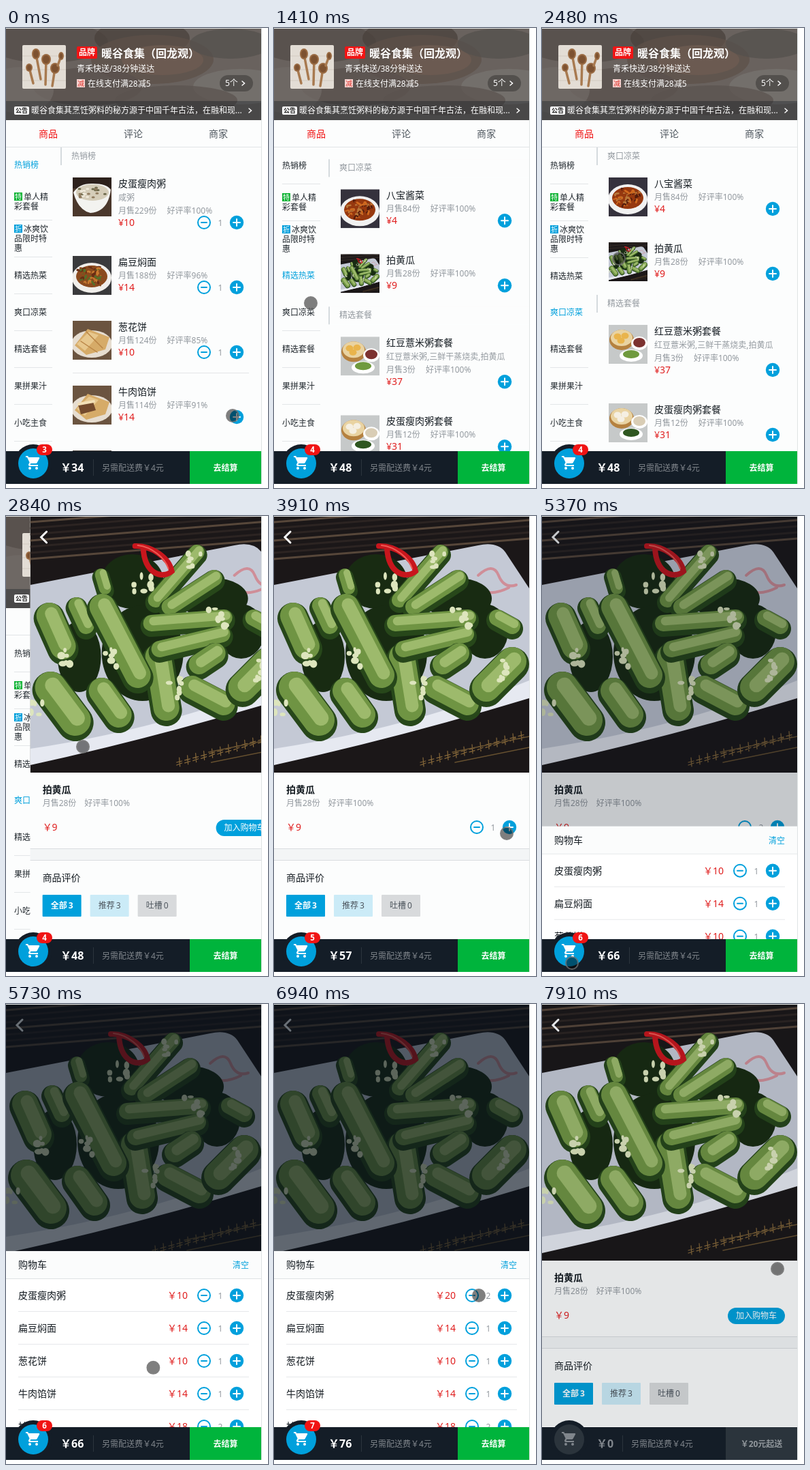
An HTML page that plays this animation: 385x674 px, repeating every 8 s.

```html
<!DOCTYPE html>
<html lang="zh-CN">
<head>
<meta charset="utf-8">
<title>点餐</title>
<style>
html, body { margin: 0; width: 100%; height: 100%; overflow: hidden; background: #fff; }
body { position: relative; font-family: "Noto Sans", "Noto Sans CJK SC", "Noto Sans CJK", sans-serif; }
div, svg { position: absolute; }
.t { white-space: pre; line-height: 20px; height: 20px; }
.t i { font-style: normal; margin-left: 15px; }
.b { font-weight: 700; }
.c { text-align: center; }
.box { box-sizing: border-box; }
.clip { overflow: hidden; }
</style>
</head>
<body>
<script>
(() => {
const LOOP = 8000;
const BLUE = '#00a0dc', RED = '#e02020', INK = '#151c22', GREY = '#93999f', DARK = '#141d27', PAGE = '#fcfdfd';

// ---------- markup helpers ----------
const box = (x, y, w, h, bg, css = '', inner = '', cls = '') =>
  `<div class="box ${cls}" style="left:${x}px;top:${y}px;width:${w}px;height:${h}px;background:${bg};${css}">${inner}</div>`;
const text = (x, y, size, color, str, cls = '', css = '') =>
  `<div class="t ${cls}" style="left:${x}px;top:${y - 10}px;font-size:${size}px;color:${color};${css}">${str}</div>`;
const mid = (x, y, w, size, color, str, cls = '') =>
  text(x - w / 2, y, size, color, str, 'c ' + cls, `width:${w}px`);
const svg = (x, y, w, h, view, inner) =>
  `<svg style="left:${x}px;top:${y}px" width="${w}" height="${h}" viewBox="0 0 ${view}">${inner}</svg>`;
const oval = (x, y, rx, ry, color, extra = '') =>
  `<ellipse cx="${x}" cy="${y}" rx="${rx}" ry="${ry}" fill="${color}" ${extra}/>`;
const stroke = (d, color, w) =>
  `<path d="${d}" fill="none" stroke="${color}" stroke-width="${w}" stroke-linecap="round"/>`;
const fill = (d, color) => `<path d="${d}" fill="${color}"/>`;
const random = seed => () => (seed = (seed * 16807) % 2147483647) / 2147483647;

function add(parent, html) {
  parent.insertAdjacentHTML('beforeend', html);
  return parent.lastElementChild;
}

// ---------- pictures ----------
function dish(bg, plate, colors, seed) {
  const r = random(seed * 7919);
  let s = `<rect width="57" height="57" fill="${bg}"/>` + oval(28, 32, 29, 22, plate) + oval(28, 30, 23, 16, colors[0]);
  for (let i = 0; i < 46; i++) {
    const a = r() * 6.28, d = Math.sqrt(r()), x = 28 + 19 * d * Math.cos(a), y = 29 + 13 * d * Math.sin(a);
    s += stroke(`M${x} ${y}q${r() * 8 - 4} ${-r() * 6} ${r() * 12 - 6} ${r() * 8 - 4}`, colors[i % colors.length], 1.5 + r() * 2);
  }
  return s;
}

function porridge() {
  let s = `<rect width="57" height="57" fill="#4b382c"/><rect width="57" height="16" fill="#2d211c"/>` +
    fill('M1 22Q10 8 30 9Q50 9 56 18Q52 50 26 52Q8 48 1 22Z', '#f3f3f0') + oval(29, 22, 24, 12, '#d5cdb9');
  const r = random(77);
  for (let i = 0; i < 24; i++) s += oval(10 + r() * 38, 15 + r() * 14, 2.5, 1.5, ['#6d6a4c', '#f0eadb', '#8f7a5d'][i % 3]);
  return s;
}

const flatbread = cut =>
  `<rect width="57" height="57" fill="#6b5440"/>` + oval(28, 34, 30, 20, '#e6ddd0') +
  fill('M3 36L22 12L54 24L48 42L20 50Z', '#d6ab68') + fill('M6 34L24 16L38 21L18 44Z', '#e7c78d') +
  (cut ? fill('M8 28L30 24L34 36L12 42Z', '#744a2d') + stroke('M9 27L31 23', '#f3dfb6', 4)
       : stroke('M20 16L44 40M12 30L36 46', '#b98445', 1.5));

const steamers = buns =>
  `<rect width="57" height="57" fill="#c6c9c9"/>` +
  oval(19, 22, 18, 15, '#b5813f') + oval(19, 19, 16, 12, '#e9d3a2') +
  [[13, 17], [24, 16], [18, 23]].map(p => oval(p[0], p[1], 5.5, 4.5, buns ? '#f5efe2' : '#e9b44c')).join('') +
  oval(45, 27, 12, 10, '#fff') + oval(45, 26, 9, 7, buns ? '#d9cdb5' : '#7c3230') +
  oval(33, 45, 17, 9, '#fff') + oval(33, 43, 12, 6, buns ? '#2f5720' : '#6f9a3e');

function cucumber() {
  let s = `<rect width="375" height="375" fill="#1b1718"/>`;
  for (let i = 0; i < 7; i++) s += stroke(`M0 ${8 + i * 9}L375 ${-22 + i * 9}`, i % 3 ? '#2c2422' : '#57473a', 3);
  s += fill('M0 100L300 42Q328 36 340 52L375 105V262Q190 322 0 362Z', '#c4c9d5') +
    fill('M0 340Q200 310 375 240V266Q190 322 0 364Z', '#e6e9f1') +
    stroke('M300 86q22 -20 30 0t26 14M305 108q16 8 40 -4', '#cf8e98', 4);
  for (const [x, y, w, h] of [[150, 95, 46, 40], [72, 205, 32, 52], [165, 200, 60, 70], [310, 168, 34, 40], [270, 120, 50, 30]])
    s += oval(x, y, w, h, '#182b12');
  // each piece: start, end, width
  const pieces = [
    [104, 85, 110, 105, 22], [68, 130, 82, 160, 28], [28, 145, 48, 190, 42], [30, 250, 66, 298, 50],
    [105, 255, 130, 290, 42], [188, 205, 200, 280, 42], [328, 148, 350, 160, 28], [245, 52, 184, 122, 26],
    [270, 90, 205, 132, 28], [178, 156, 285, 148, 28], [190, 194, 282, 172, 28], [248, 216, 272, 200, 34],
    [238, 250, 284, 274, 38], [312, 250, 350, 212, 46], [106, 132, 158, 232, 42]
  ];
  for (const [a, b, c, d, w] of pieces) {
    s += stroke(`M${a} ${b + 4}L${c} ${d + 4}`, '#27471a', w + 4) + stroke(`M${a} ${b}L${c} ${d}`, '#6f9443', w - 4) +
      stroke(`M${a + 3} ${b - 3}L${c + 3} ${d - 3}`, '#9dba6c', w * .45);
  }
  const r = random(4242);
  for (const [x, y] of [[165, 95], [115, 205], [50, 205], [245, 60], [275, 150], [340, 225], [8, 285], [215, 250]])
    for (let i = 0; i < 7; i++) s += oval(x + r() * 26 - 13, y + r() * 30 - 15, 2 + r() * 4, 2 + r() * 4, '#dde5bd');
  s += stroke('M154 43C178 42 204 60 208 80C194 92 168 84 166 46', '#c8161d', 8) + stroke('M158 42C178 44 198 60 203 76', '#ee5a54', 2);
  for (let i = 0; i < 13; i++)
    s += stroke(`M${215 + i * 12} ${360 - i * 3.2}l8 -2m-4 -5l1 13m-5 -2l8 -${2 + r() * 3}`, '#86683a', 1.2);
  return s + stroke('M262 345L375 322M266 360L375 338', '#66502f', 1.5);
}

const PICS = {
  porridge: porridge(),
  noodle: dish('#3a3a3c', '#f0eeea', ['#8b4a1d', '#c87a2f', '#54702a', '#692d14'], 3),
  pancake: flatbread(false),
  pie: flatbread(true),
  pickle: dish('#35323d', '#f1f1f1', ['#96380f', '#d0691f', '#541c0c', '#b9783a'], 8),
  greens: dish('#48413b', '#eeeeea', ['#5c8136', '#a9bb63', '#385620', '#d6c78a'], 12),
  set: steamers(false),
  set2: steamers(true)
};
const CUCUMBER = cucumber();
const thumb = (x, y, pic) => pic === 'cucumber'
  ? svg(x, y, 57, 57, '375 375', CUCUMBER) : svg(x, y, 57, 57, '57 57', PICS[pic]);

// ---------- cart model: name, price, amount at the start ----------
const CART = [['皮蛋瘦肉粥', 10, 1], ['扁豆焖面', 14, 1], ['葱花饼', 10, 1], ['牛肉馅饼', 14, 0], ['拍黄瓜', 9, 0]];
// time, item, change, ball start
const CLICKS = [[120, 3, 1, 339, 570], [3570, 4, 1, 315, 457], [4390, 4, 1, 345, 456], [6580, 0, 1, 339, 427], [7180, 0, -1]];
const CLEAR = 7790;
const amounts = t => CART.map((f, i) => t >= CLEAR ? 0 :
  CLICKS.reduce((n, c) => n + (c[1] === i && t >= c[0] ? c[2] : 0), f[2]));

// ---------- count controls ----------
const controls = [];
function control(parent, x, y, item) {
  const minus = add(parent, svg(x - 11, y - 11, 22, 22, '22 22',
    `<circle cx="11" cy="11" r="9" fill="none" stroke="${BLUE}" stroke-width="2"/>` + stroke('M7 11H15', BLUE, 2)));
  const count = add(parent, mid(x + 24, y + 1, 24, 12, GREY, ''));
  add(parent, svg(x + 37, y - 11, 22, 22, '22 22', oval(11, 11, 10.2, 10.2, BLUE) + stroke('M6 11H16M11 6V16', '#fff', 2)));
  controls.push({ minus, count, item });
}

// ---------- shop page ----------
const app = add(document.body, box(0, 0, 376, 668, PAGE, 'border-right:1px solid #dfe3e4', '', 'clip'));
const SHOP = '暖谷食集';

const blobs = [[60, 20, 90, 30, '#544c48'], [200, 14, 70, 28, '#4a403b'], [215, 45, 90, 36, '#5e5049'], [230, 46, 60, 22, '#6f5d52'],
  [330, 22, 60, 22, '#55504d'], [345, 85, 70, 26, '#77736f'], [120, 85, 80, 28, '#5a514c'], [20, 90, 50, 34, '#716a66'], [250, 105, 90, 22, '#5b534f']];
const spoon = (x, y, rx, ry, x2, y2) =>
  stroke(`M${x} ${y}L${x2} ${y2}`, '#a87a50', 3.5) + oval(x, y, rx, ry, '#9a6b43') + oval(x, y, rx - 2, ry - 2, '#7d5231');
const chevron = (x, y) => svg(x, y, 8, 10, '8 10', stroke('M2 2L5.5 5L2 8', '#fff', 1.5));

add(app, box(0, 1, 375, 134, '#69625e', '',
  svg(0, 0, 375, 134, '375 134', blobs.map(b => oval(...b, 'opacity=".75"')).join('')) +
  svg(24, 24, 64, 64, '64 64', '<rect width="64" height="64" rx="2" fill="#e3ddd5"/>' +
    stroke('M0 16H64M0 36H64M0 52H64', '#d3cbc1', 1) + spoon(20, 13, 6, 8, 27, 50) + spoon(35, 21, 7, 8, 34, 58) +
    spoon(10, 33, 5, 6, 16, 56) + spoon(48, 34, 7, 8, 44, 60) + spoon(57, 16, 4, 6, 52, 30)) +
  box(104, 26, 30, 18, '#f01414', 'border-radius:2px') + mid(119, 35, 30, 12, '#fff', '品牌', 'b') +
  text(140, 36, 16, '#fff', SHOP + '（回龙观）', 'b') +
  text(104, 59, 12, '#fff', '青禾快送/38分钟送达') +
  box(104, 74, 12, 12, '#f8d5d2') + mid(110, 80, 12, 10, '#dc3b34', '减') +
  text(120, 81, 12, '#fff', '在线支付满28减5') +
  box(314, 68, 49, 24, 'rgba(0,0,0,.28)', 'border-radius:12px') + text(322, 80, 12, '#fff', '5个') + chevron(345, 75) +
  box(0, 106, 375, 28, 'rgba(7,17,27,.32)') +
  box(12, 114, 22, 12, '#fff', 'border-radius:2px') + mid(23, 120, 24, 9, '#222', '公告', 'b') +
  text(37, 120, 12, '#fff', SHOP + '其烹饪粥料的秘方源于中国千年古法，在融和现...') + chevron(355, 115), 'clip'));

['商品', '评论', '商家'].forEach((s, i) => add(app, mid(62 + 125 * i, 155, 60, 14, i ? '#4d555d' : '#f01414', s)));
add(app, box(0, 174, 375, 1, '#e2e5e7'));

const MENU = ['热销榜', '单人精<br>彩套餐', '冰爽饮<br>品限时特<br>惠', '精选热菜', '爽口凉菜', '精选套餐', '果拼果汁', '小吃主食'];
const TAGS = { 1: ['特', '#10b436'], 2: ['折', BLUE] };
const menu = MENU.map((label, i) => {
  const lines = label.split('<br>').length, y = 27 - lines * 7, tag = TAGS[i];
  return add(app, box(0, 0, 80, 54, 'none', 'font-size:12px;line-height:14px',
    `<div style="left:12px;top:${y}px;white-space:nowrap;text-indent:${tag ? 14 : 0}px">${label}</div>` +
    (tag ? box(12, y, 12, 12, tag[1]) + mid(18, y + 6, 12, 10, '#fff', tag[0]) : '') +
    box(12, 53, 56, 1, '#e3e6e8')));
});

// name, price, sold, rating, picture, description, cart index
const SECTIONS = [
  ['热销榜', [['皮蛋瘦肉粥', 10, 229, 100, 'porridge', '咸粥', 0], ['扁豆焖面', 14, 188, 96, 'noodle', '', 1],
    ['葱花饼', 10, 124, 85, 'pancake', '', 2], ['牛肉馅饼', 14, 114, 91, 'pie', '', 3],
    ['手撕包菜', 17, 101, 100, 'greens'], ['南瓜粥', 9, 91, 100, 'porridge'], ['红豆薏米粥', 12, 86, 100, 'porridge']]],
  ['单人精彩套餐', [['红枣山药粥套餐', 29, 17, 100, 'set', '红枣山药粥,素材包']]],
  ['冰爽饮品限时特惠', [['百合糖水', 10, 7, 100, 'porridge'], ['绿豆汤', 8, 5, 100, 'porridge']]],
  ['精选热菜', [['娃娃菜炖豆腐', 17, 43, 92, 'greens'], ['清炒时蔬', 17, 29, 100, 'greens'], ['鱼香茄子', 19, 15, 100, 'pickle']]],
  ['爽口凉菜', [['八宝酱菜', 4, 84, 100, 'pickle'], ['拍黄瓜', 9, 28, 100, 'cucumber', '', 4]]],
  ['精选套餐', [['红豆薏米粥套餐', 37, 3, 100, 'set', '红豆薏米粥,三鲜干蒸烧卖,拍黄瓜'], ['皮蛋瘦肉粥套餐', 31, 12, 100, 'set2']]]
];
const panel = add(app, box(80, 175, 295, 445, 'none', '', '', 'clip'));
const foods = add(panel, box(0, 0, 295, 0, 'none'));
const offsets = [];
let rowTop = 0;
for (const [title, items] of SECTIONS) {
  offsets.push(rowTop);
  add(foods, box(0, rowTop, 295, 26, PAGE, 'border-left:2px solid #d5dade'));
  add(foods, text(16, rowTop + 13, 12, GREY, title));
  rowTop += 26;
  for (const [name, price, sold, rate, pic, desc, item = -1] of items) {
    const y = rowTop + 18, more = desc ? 20 : 0;
    add(foods, thumb(18, y, pic));
    add(foods, text(85, y + 9, 14, INK, name));
    if (desc) add(foods, text(85, y + 30, 12, GREY, desc));
    add(foods, text(85, y + 29 + more, 12, GREY, `月售${sold}份<i>好评率${rate}%</i>`));
    add(foods, text(85, y + 46 + more, 14, RED, '¥' + price));
    control(foods, 211, y + 46 + more, item);
    rowTop += 95 + more;
    if (item === 2) add(foods, box(18, rowTop - 1, 259, 1, '#e3e6e8'));
  }
}
const SCROLL = offsets[4];

// ---------- detail page ----------
const detail = add(app, box(0, 1, 375, 667, PAGE, '',
  svg(0, 0, 375, 375, '375 375', CUCUMBER) +
  svg(12, 18, 16, 24, '16 24', stroke('M12 4L4 12L12 20', '#fff', 3)) +
  text(18, 400, 14, INK, '拍黄瓜', 'b') + text(18, 420, 12, GREY, '月售28份<i style="margin-left:12px">好评率100%</i>') +
  text(18, 455, 14, RED, '￥9') +
  box(0, 486, 375, 18, '#f3f5f6', 'border:solid #dadde0;border-width:1px 0') +
  text(18, 529, 14, INK, '商品评价') +
  [['全部', 3, BLUE, '#fff', 'b'], ['推荐', 3, '#cbebf7', '#4d555d', ''], ['吐槽', 0, '#d8dadc', '#4d555d', '']]
    .map(([label, n, bg, color, cls], i) => box(18 + i * 70, 554, 57, 32, bg, 'border-radius:1px') +
      mid(46.5 + i * 70, 570, 57, 12, color, `${label}<span style="margin-left:2px">${n}</span>`, cls)).join('')));
control(detail, 298, 455, 4);
const buy = add(detail, box(273, 444, 84, 24, BLUE, 'border-radius:12px', mid(42, 12, 84, 12, '#fff', '加入购物车')));

// ---------- cart list, bar, pointer ----------
const mask = add(app, box(0, 1, 375, 667, '#07111b'));
const listClip = add(app, box(0, 0, 375, 620, 'none', '', '', 'clip'));
const list = add(listClip, box(0, 0, 375, 258, '#fff', '', '', 'clip'));
add(list, box(0, 0, 375, 41, '#fbfcfc', 'border-bottom:1px solid #dfe2e5'));
add(list, text(18, 20, 14, INK, '购物车'));
add(list, text(333, 21, 12, BLUE, '清空'));
const rows = add(list, box(0, 41, 375, 217, '#fff'));
const rowPrices = CART.map(([name], i) => {
  const y = 24 + 48 * i;
  add(rows, text(18, y, 14, INK, name));
  add(rows, box(18, y + 23, 339, 1, '#e6e8ea'));
  control(rows, 291, y, i);
  return add(rows, text(237, y, 14, RED, ''));
});

const CART_ICON = 'M7 18a2 2 0 1 0 0 4 2 2 0 0 0 0-4zM1 2v2h2l3.6 7.6-1.4 2.4c-.7 1.4.3 3 1.8 3h12v-2H7.4l1-2h7.4c.8 0 1.4-.4 1.8-1l3.5-6.5A1 1 0 0 0 20 4H5.2l-.9-2H1zm16 16a2 2 0 1 0 0 4 2 2 0 0 0 0-4z';
add(app, box(0, 620, 375, 48, DARK));
const pay = add(app, box(270, 620, 105, 48, 'none'));
const payText = add(app, mid(322.5, 645, 105, 12, '#fff', '', 'b'));
add(app, box(12, 610, 56, 56, DARK, 'border-radius:50%'));
const logo = add(app, box(18, 616, 44, 44, BLUE, 'border-radius:50%', svg(10, 9, 24, 24, '24 24', fill(CART_ICON, 'currentColor'))));
const total = add(app, text(80, 644, 16, '#fff', '', 'b'));
const rule = add(app, box(128, 632, 1, 24, '#2b343d'));
const fee = add(app, text(141, 645, 12, '#80868c', '另需配送费￥4元'));
const badge = add(app, box(45, 610, 23, 16, '#f01414', 'border-radius:8px'));
const badgeText = add(app, mid(56.5, 618, 23, 11.5, '#fff', '', 'b'));
const ball = add(app, box(-8, -8, 16, 16, BLUE, 'border-radius:50%'));
add(app, box(0, 0, 376, 1, '#e3e6e6'));
const pointer = add(document.body, box(-10, -10, 20, 20, 'rgba(0,0,0,.5)', 'border-radius:50%;border:2px solid rgba(128,128,128,.7)'));

// ---------- motion ----------
const clamp = v => Math.max(0, Math.min(1, v));
const span = (t, from, length) => clamp((t - from) / length);
function bezier(x1, y1, x2, y2) {
  const at = (a, b, u) => 3 * (1 - u) * (1 - u) * u * a + 3 * (1 - u) * u * u * b + u * u * u;
  return x => {
    let lo = 0, hi = 1;
    for (let i = 0; i < 24; i++) {
      const u = (lo + hi) / 2;
      if (at(x1, x2, u) < x) lo = u; else hi = u;
    }
    return at(y1, y2, lo);
  };
}
const ease = bezier(.25, .1, .25, 1), toss = bezier(.49, -.29, .75, .41);

// time, x, y
const PATH = [[0, 333, 568], [810, 333, 568], [1050, 54, 403], [1530, 54, 403], [2020, 111, 343], [2380, 113, 338], [2900, 113, 338],
  [3330, 322, 457], [3600, 322, 457], [3850, 342, 465], [4640, 342, 465], [4990, 44, 655], [5400, 44, 655], [5970, 322, 458],
  [6330, 337, 436], [6700, 337, 436], [6940, 301, 427], [7300, 301, 427], [7550, 346, 388], [LOOP, 346, 388]];
const move = (el, x, y) => { el.style.transform = `translate(${x}px,${y}px)`; };
const show = (el, on) => { el.style.visibility = on ? 'inherit' : 'hidden'; };
const write = (el, s) => { if (el.textContent !== String(s)) el.textContent = s; };

function drawShop(t) {
  const scroll = SCROLL * (1 - (1 - span(t, 1236, 300)) ** 5);
  move(foods, 0, -scroll);
  const active = offsets.filter(o => o <= scroll + .5).length - 1;
  menu.forEach((el, i) => {
    move(el, 0, 175 + 54 * i - (i >= active ? 1 : 0));
    el.style.color = i === active ? BLUE : '#20272d';
    show(el.lastElementChild, i !== active && i !== active - 1);
  });
  move(detail, 375 * (1 - span(t, 2660, 200)), 0);
}

function drawCart(t) {
  const n = amounts(t);
  const count = n.reduce((a, b) => a + b), sum = n.reduce((s, q, i) => s + q * CART[i][1], 0), empty = !count;
  for (const { minus, count: label, item } of controls) {
    const q = item < 0 ? 0 : n[item];
    const first = CLICKS.find(c => c[1] === item && !CART[item][2]);
    const p = first ? span(t, first[0], 300) : 1;
    show(minus, q);
    show(label, q);
    minus.style.opacity = label.style.opacity = p;
    minus.style.transform = `translateX(${24 * (1 - p)}px) rotate(${180 * (1 - p)}deg)`;
    write(label, q);
  }
  rowPrices.forEach((el, i) => write(el, '￥' + n[i] * CART[i][1]));
  buy.style.opacity = n[4] ? 1 - span(t, 3570, 200) : 1;
  write(total, '￥' + sum);
  write(badgeText, count);
  show(badge, !empty);
  show(badgeText, !empty);
  total.style.color = empty ? '#80868c' : '#fff';
  logo.style.background = empty ? '#2b343c' : BLUE;
  logo.style.color = empty ? '#80868c' : '#fff';
  pay.style.background = empty ? '#2b343c' : '#00b43c';
  payText.style.color = empty ? '#90969b' : '#fff';
  write(payText, empty ? '￥20元起送' : '去结算');
  move(rule, empty ? -10 : 0, 0);
  move(fee, empty ? -10 : 0, 0);

  const opened = span(t, 5185, 500), closed = empty ? span(t, 7700, 250) : 0;
  const height = empty ? 41 : 258;
  mask.style.opacity = .6 * opened * (1 - closed);
  show(rows, !empty);
  list.style.height = height + 'px';
  move(list, 0, 620 - height * ease(opened) * (1 - ease(closed)));
}

function drawBall(t) {
  const c = CLICKS.find(c => c[2] > 0 && t >= c[0] && t < c[0] + 320);
  show(ball, c);
  if (!c) return;
  const p = span(t, c[0], 320);
  move(ball, c[3] + (40 - c[3]) * p, c[4] + (638 - c[4]) * toss(p));
}

function drawPointer(t) {
  const i = PATH.findIndex(k => k[0] > t);
  const [t0, x0, y0] = PATH[i - 1], [t1, x1, y1] = PATH[i];
  const p = (t - t0) / (t1 - t0), e = p * p * (3 - 2 * p);
  move(pointer, x0 + (x1 - x0) * e, y0 + (y1 - y0) * e);
}

const began = performance.now();
function frame() {
  const t = (performance.now() - began) % LOOP;
  drawShop(t);
  drawCart(t);
  drawBall(t);
  drawPointer(t);
  requestAnimationFrame(frame);
}
frame();
})();
</script>
</body>
</html>
```
